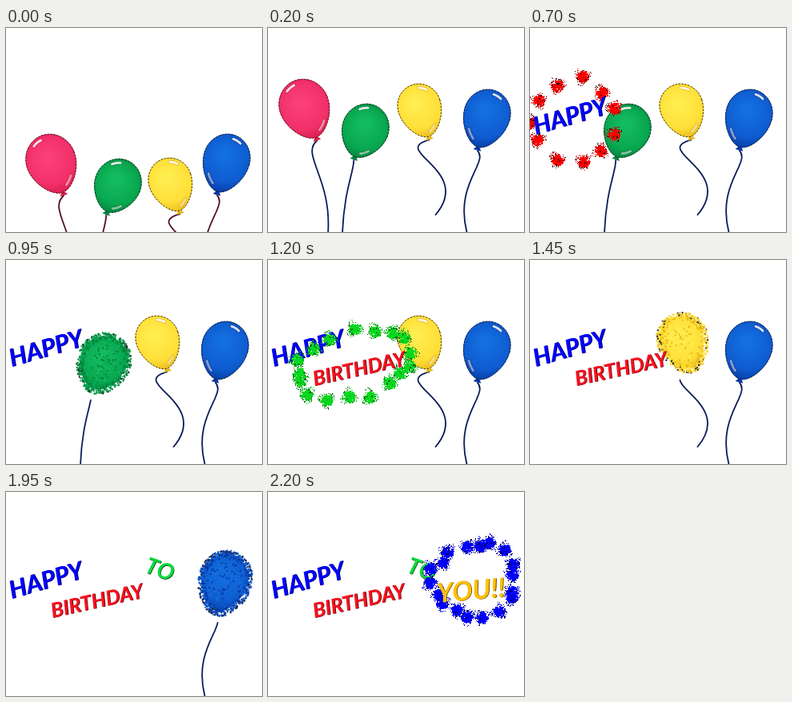
Write an HTML page with a canvas that moves like this. It is 320 by 256 pixels and loops after 2450 ms.

```html
<!DOCTYPE html>
<html lang="en">
<head>
<meta charset="utf-8">
<title>Happy Birthday</title>
<style>
html, body { margin: 0; width: 100%; height: 100%; overflow: hidden; background: #fff; }
canvas { display: block; }
</style>
</head>
<body>
<canvas id="stage" width="320" height="256"></canvas>
<script>
const ctx = document.getElementById('stage').getContext('2d');
const TAU = Math.PI * 2;
const LOOP = 2450;

// Each balloon bursts into a ring of splats that reveals one word.
// string: end point and the two x positions it bends towards.
// shine: angles of the bright dabs along the outline.
const acts = [
  {
    x: 45, y: 97, r: 31, up: 33, down: 43, tilt: -0.36, rise: [11, 69],
    colors: ['#fb4078', '#f2306a', '#d81c48'], shine: [-1.9, 1],
    string: { x: 75, y: 258, bend: [40, 80] },
    word: { text: 'HAPPY', x: 7, y: 134, turn: -0.28, size: 30.5, color: '#00f', dark: '#000060' },
    ring: { x: 57, y: 115, rx: 55, ry: 50, count: 11, colors: ['#f00', '#300'] }
  },
  {
    x: 122, y: 126, r: 29, up: 31, down: 38, tilt: 0.36, rise: [18, 69],
    colors: ['#14bc60', '#08a850', '#04803c'], shine: [-2.05, 1.1],
    string: { x: 93, y: 258, bend: [108, 95] },
    word: { text: 'BIRTHDAY', x: 58, y: 158, turn: -0.22, size: 25.5, color: '#ff1020', dark: '#500' },
    ring: { x: 108, y: 130, rx: 76, ry: 41, count: 17, colors: ['#08d820', '#0a6814'] }
  },
  {
    x: 189, y: 98, r: 27, up: 28, down: 40, tilt: -0.3, rise: [16, 93],
    colors: ['#ffee50', '#ffdf38', '#e8b818'], shine: [-1.05, 1.16],
    string: { x: 209, y: 235, bend: [150, 258] },
    word: { text: 'TO', x: 172, y: 100, turn: 0.34, size: 28, color: '#0cdc3c', dark: '#042808' },
    ring: { x: 190, y: 100, rx: 42, ry: 44, count: 13, colors: ['#ffd818', '#806000'] }
  },
  {
    x: 274, y: 108, r: 29, up: 31, down: 43, tilt: 0.27, rise: [2, 56],
    colors: ['#1470e0', '#0e5cd0', '#0638a0'], shine: [-1.3, 2.24],
    string: { x: 249, y: 258, bend: [277, 232] },
    word: { text: 'YOU!!', x: 212, y: 139, turn: -0.09, size: 33.5, color: '#ffc008', dark: '#604000' },
    ring: { x: 257, y: 110, rx: 53, ry: 46, count: 18, colors: ['#00f', '#000060'] }
  }
];

let seed = 1;
function rand() {
  seed = (seed * 16807) % 2147483647;
  return seed / 2147483647;
}

function dot(x, y, color, size) {
  ctx.fillStyle = color;
  ctx.fillRect(Math.round(x), Math.round(y), size, size);
}

// Point of the egg-shaped outline at angle a.
function rim({ r, up, down }, a, grow = 0) {
  const s = Math.sin(a);
  const taper = s > 0 ? 1 - 0.2 * s * s : 1;
  return [Math.cos(a) * (r + grow) * taper, s * ((s < 0 ? up : down) + grow)];
}

function traceRim(act, from, to, grow) {
  ctx.beginPath();
  for (let i = 0; i <= 40; i++) ctx.lineTo(...rim(act, from + (to - from) * i / 40, grow));
}

function drawString({ x, y, down, tilt, string }, rough, low) {
  const reach = down + 4;
  const startX = x - Math.sin(tilt) * reach;
  const startY = y + Math.cos(tilt) * reach;
  const along = f => startY + (string.y - startY) * f;
  ctx.save();
  if (rough) {
    ctx.beginPath();
    ctx.rect(0, startY + 10, 320, 256);
    ctx.clip();
  }
  ctx.beginPath();
  ctx.moveTo(startX, startY);
  ctx.bezierCurveTo(string.bend[0], along(0.15), string.bend[1], along(0.4), string.x, string.y);
  ctx.lineWidth = 1.8;
  ctx.strokeStyle = low ? '#501028' : '#0c1c58';
  ctx.stroke();
  ctx.restore();
}

function drawShine(act, a, alpha) {
  traceRim(act, a - 0.22, a + 0.22, -5);
  ctx.lineCap = 'round';
  ctx.lineWidth = 4.5;
  ctx.strokeStyle = act.colors[2];
  ctx.stroke();
  ctx.lineWidth = 3;
  ctx.strokeStyle = `rgba(255,255,255,${alpha})`;
  ctx.stroke();
}

function roughen(act) {
  for (let i = 0; i < 650; i++) {
    const a = rand() * TAU;
    const grow = rand() * 9 - 4;
    const shade = rand();
    const color = shade < 0.05 + grow * 0.04 ? '#222' : act.colors[shade < 0.5 ? 2 : 1];
    dot(...rim(act, a, grow), color, 2);
  }
  for (let i = 0; i < 150; i++) {
    dot(...rim(act, rand() * TAU, -act.r * rand()), act.colors[i % 3], 2);
  }
}

function drawBalloon(act, rough, low) {
  const { x, y, tilt, down, colors } = act;
  ctx.save();
  if (low) ctx.translate(...act.rise);
  drawString(act, rough, low);
  ctx.translate(x, y);
  ctx.rotate(tilt);

  if (!rough) {
    ctx.beginPath();
    ctx.moveTo(0, down - 3);
    ctx.lineTo(5, down + 4);
    ctx.lineTo(-5, down + 4);
    ctx.fillStyle = colors[2];
    ctx.fill();
  }

  const shade = ctx.createRadialGradient(-4, -5, 4, 0, 3, down);
  colors.forEach((color, i) => shade.addColorStop([0, 0.65, 1][i], color));
  ctx.fillStyle = shade;
  traceRim(act, 0, TAU);
  ctx.fill();
  if (rough) {
    roughen(act);
  } else {
    ctx.lineWidth = 0.8;
    ctx.strokeStyle = colors[2];
    ctx.stroke();
    ctx.setLineDash([2, 2]);
    ctx.strokeStyle = '#181818';
    ctx.stroke();
    ctx.setLineDash([]);
    drawShine(act, act.shine[0], 0.85);
    drawShine(act, act.shine[1], 0.5);
  }
  ctx.restore();
}

function drawSplat(x, y, [bright, dark]) {
  for (let i = 0; i < 240; i++) {
    const a = rand() * TAU;
    const d = rand() * (10 + 2 * Math.sin(a * 3 + x));
    const edge = d > 7;
    dot(x + Math.cos(a) * d, y + Math.sin(a) * d, rand() < (edge ? 0.5 : 0.08) ? dark : bright, edge ? 1 : 2);
  }
}

function drawRing({ x, y, rx, ry, count, colors }, turn) {
  const jitter = () => rand() * 10 - 5;
  for (let i = 0; i < count; i++) {
    const a = TAU * i / count;
    const u = rx * Math.cos(a), v = ry * Math.sin(a);
    drawSplat(
      x + u * Math.cos(turn) - v * Math.sin(turn) + jitter(),
      y + u * Math.sin(turn) + v * Math.cos(turn) + jitter(),
      colors
    );
  }
}

function drawWord({ text, x, y, turn, size, color, dark }) {
  ctx.save();
  ctx.translate(x, y);
  ctx.rotate(turn);
  ctx.font = `italic bold ${size}px Lato, sans-serif`;
  ctx.fillStyle = dark;
  ctx.fillText(text, 0.8, 0.4);
  ctx.fillStyle = color;
  ctx.fillText(text, 0, 0);
  ctx.restore();
}

function draw(step) {
  seed = 77 + step;
  ctx.fillStyle = '#fff';
  ctx.fillRect(0, 0, 320, 256);
  const burst = i => 3 + 2 * i;
  acts.forEach((act, i) => {
    if (step < burst(i)) drawBalloon(act, step === burst(i) - 1, step === 0);
  });
  acts.forEach((act, i) => {
    if (step === burst(i)) drawRing(act.ring, act.word.turn);
    if (step >= burst(i)) drawWord(act.word);
  });
}

function tick() {
  const t = performance.now() % LOOP;
  draw(t < 200 ? 0 : 1 + Math.floor((t - 200) / 250));
  requestAnimationFrame(tick);
}
tick();
</script>
</body>
</html>
```
